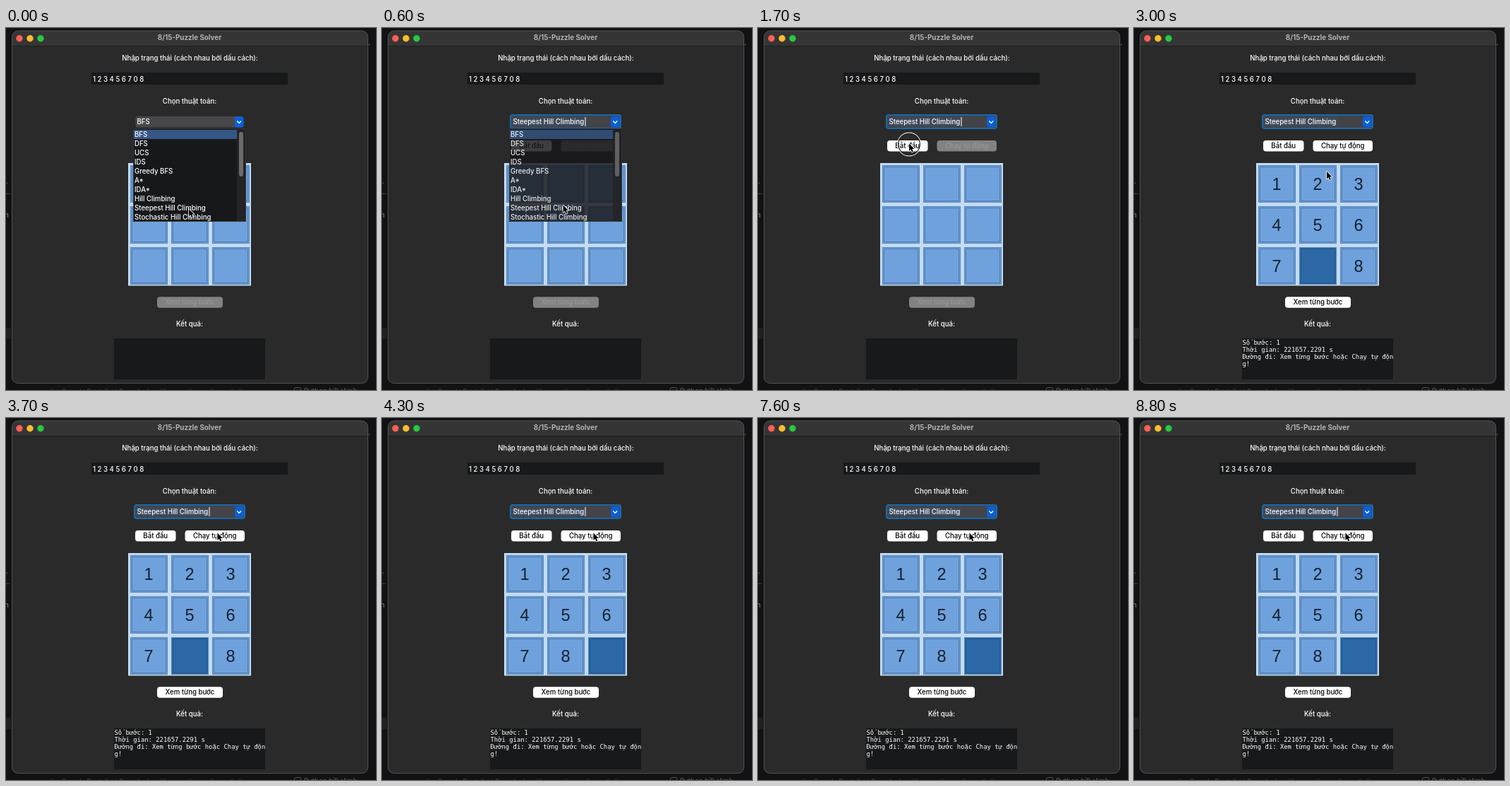
Animation, 524 px wide and 512 px high, one loop 9 s. Source, as an HTML page with a canvas:

```html
<!DOCTYPE html>
<html lang="vi">
<head>
<meta charset="utf-8">
<title>8/15-Puzzle Solver</title>
<style>
html, body { margin: 0; width: 100%; height: 100%; overflow: hidden; background: #121214; }
canvas { display: block; }
</style>
</head>
<body>
<canvas id="stage" width="524" height="512"></canvas>
<script>
const ctx = document.getElementById('stage').getContext('2d');
const LOOP = 9000, STEP = 100;
const SANS = '500 9.62px Inter, "Open Sans", sans-serif';
const MONO = '8.9px "DejaVu Sans Mono", monospace';
const ALGORITHMS = ['BFS', 'DFS', 'UCS', 'IDS', 'Greedy BFS', 'A*', 'IDA*',
  'Hill Climbing', 'Steepest Hill Climbing', 'Stochastic Hill Climbing'];
const RESULT = ['Số bước: 1', 'Thời gian: 221657.2291 s',
  'Đường đi: Xem từng bước hoặc Chạy tự độn', 'g!'];
const CHOSEN = 600, SOLVED = 1900, PLAYED = 4200;

// Pointer stops: time, x, y
const PATH = [[0, 259, 256], [400, 256.5, 250.5], [600, 256.5, 250.5], [1500, 214, 163.5],
  [2700, 214, 163.5], [3000, 273, 203], [3700, 299.5, 162.5], [LOOP, 299.5, 162.5]];

function box(x, y, w, h, fill, r = 0) {
  ctx.fillStyle = fill;
  ctx.beginPath();
  ctx.roundRect(x, y, w, h, r);
  ctx.fill();
}

function frame(x, y, w, h, color, r = 0, width = 1) {
  ctx.strokeStyle = color;
  ctx.lineWidth = width;
  ctx.beginPath();
  ctx.roundRect(x + width / 2, y + width / 2, w - width, h - width, r);
  ctx.stroke();
}

function disc(x, y, r, fill) {
  ctx.fillStyle = fill;
  ctx.beginPath();
  ctx.arc(x, y, r, 0, 7);
  ctx.fill();
}

function text(str, x, y, color = '#fff', align = 'left', font = SANS) {
  ctx.font = font;
  ctx.textAlign = align;
  ctx.fillStyle = color;
  ctx.fillText(str, x, y);
}

function button(label, x, y, w, enabled) {
  box(x, y, w, 15.5, enabled ? '#ffffff' : '#828282', 4);
  text(label, x + w / 2, y + 11, enabled ? '#000' : '#979797', 'center');
}

function drawDesktop() {
  box(0, 0, 524, 512, '#121214');
  box(0, 424, 7, 16, '#202022');
  text('.', 0, 220, '#777');
  text('..', 0, 235, '#777');
  text('n', -2, 268, '#777');
  text('.', 513, 24, '#999');
  text('as the Greedy Best-first Search algorithm continues the path then', 48, 517.5, '#3c3c3e');
  frame(408, 508, 10, 10, '#555', 2);
  text('Python hill climb', 422, 517, '#5a5a5c');
}

function drawWindow() {
  box(8, 3.5, 505, 499.5, '#2a2a2a', 9);
  box(8.5, 4, 504, 21, '#353536', [9, 9, 0, 0]);
  box(9, 25, 503, 1, '#1e1e1e');
  frame(8, 3.5, 505, 499.5, '#505050', 9);
  ['#fe5f57', '#febc2e', '#28c840'].forEach((c, i) => disc(19 + 15 * i, 14.8, 4.7, c));
  text('8/15-Puzzle Solver', 260, 17, '#b4b2b3', 'center', 'bold 9.8px Inter, sans-serif');
  text('Nhập trạng thái (cách nhau bởi dấu cách):', 260.5, 45.5, undefined, 'center');
  box(121, 63, 278, 17, '#17191b');
  text('1 2 3 4 5 6 7 0 8', 123, 75.5);
  text('Chọn thuật toán:', 260, 106.5, undefined, 'center');
  text('Kết quả:', 260, 421.5, undefined, 'center');
  box(153, 439, 214, 58, '#17191b');
}

function caretOn(t) {
  if (t < 2500) return t < 1200 || (t >= 1500 && t < 2100);
  return (t + 99 - 4830 + 5 * 925) % 925 >= 300;
}

function drawCombo(t) {
  const chosen = t >= CHOSEN;
  box(183.5, 125, 153, 15.5, '#48474a', 3);
  if (chosen) {
    box(182, 123, 156, 19, '#444347', 3);
    box(184, 126, 104, 13, '#3d4a5c');
    frame(181, 122, 158, 21, '#1a69a8', 3, 2);
  }
  box(324, 125, 12.5, 15.5, '#0a5fd8', 3);
  ctx.strokeStyle = '#fff';
  ctx.lineWidth = 1.4;
  ctx.beginPath();
  ctx.moveTo(327.3, 131.5);
  ctx.lineTo(330.2, 134.5);
  ctx.lineTo(333.1, 131.5);
  ctx.stroke();
  text(chosen ? ALGORITHMS[8] : 'BFS', 185.5, 136.3);
  if (chosen && caretOn(t)) box(287.5, 126, 1, 13, '#fff');
}

function drawBoard(t) {
  box(173, 191, 174, 173.5, '#c3dbf4');
  const cells = t < SOLVED ? '         ' : t < PLAYED ? '1234567 8' : '12345678 ';
  [...cells].forEach((digit, i) => {
    const x = 176 + 58 * (i % 3), y = 194 + 58 * Math.floor(i / 3);
    const blank = t >= SOLVED && digit === ' ';
    box(x, y, 53, 53, blank ? '#2b68a5' : '#6fa1dc');
    frame(x, y, 53, 53, '#5685b8');
    frame(x + 2, y + 2, 49, 49, blank ? '#24598f' : '#4d7cae');
    text(digit, x + 26, y + 35.3, '#14212f', 'center', '23.5px "Liberation Sans", Arial, sans-serif');
  });
}

function drawList(t) {
  const alpha = t < CHOSEN ? 1 : 0.83 - (t - CHOSEN) / 330;
  if (alpha <= 0) return;
  ctx.globalAlpha = alpha;
  box(180, 142, 160, 132, '#17181a');
  frame(180, 142, 160, 132, '#343436');
  box(327, 143, 12, 130, '#242426');
  box(330, 147, 6, 63, '#6c6c6e', 3);
  box(181, 144, 146, 13, '#365785');
  ctx.globalAlpha = Math.sqrt(alpha);
  ALGORITHMS.forEach((name, i) => text(name, 182, 153.7 + 12.99 * i));
  ctx.globalAlpha = 1;
}

function pointerAt(t) {
  const i = PATH.findIndex(p => p[0] > t);
  const [t0, x0, y0] = PATH[i - 1], [t1, x1, y1] = PATH[i];
  const u = (t - t0) / (t1 - t0), e = u * u * (3 - 2 * u);
  return [x0 + (x1 - x0) * e, y0 + (y1 - y0) * e];
}

function drawRing(x, y, r) {
  for (const [radius, color] of [[r, '#e8e8e8'], [r - 1.2, '#222']]) {
    ctx.strokeStyle = color;
    ctx.lineWidth = 1.2;
    ctx.beginPath();
    ctx.arc(x, y, radius - 0.6, 0, 7);
    ctx.stroke();
  }
}

function drawPointer(t) {
  const [x, y] = pointerAt(t);
  const ring = { 1600: 13, 1700: 17, 1800: 15, 3800: 13, 3900: 12 }[t];
  if (ring) drawRing(x, y + 1, ring);
  ctx.save();
  ctx.translate(x, y);
  ctx.beginPath();
  [[0, 0], [0, 10.5], [2.4, 8.3], [4, 12], [5.8, 11.2], [4.2, 7.6], [7.4, 7.4]]
    .forEach(p => ctx.lineTo(...p));
  ctx.closePath();
  ctx.lineJoin = 'round';
  ctx.strokeStyle = '#fff';
  ctx.lineWidth = 1.6;
  ctx.stroke();
  ctx.fillStyle = '#000';
  ctx.fill();
  ctx.restore();
}

function draw(t) {
  const solved = t >= SOLVED;
  drawDesktop();
  drawWindow();
  drawCombo(t);
  button('Bắt đầu', 183, 159, 57.5, true);
  button('Chạy tự động', 253.5, 159, 84.5, solved);
  drawBoard(t);
  button('Xem từng bước', 214, 380.3, 93, solved);
  if (solved) RESULT.forEach((line, i) => text(line, 153.5, 447.7 + 10 * i, '#fff', 'left', MONO));
  drawList(t);
  drawPointer(t);
}

const start = performance.now();
function tick() {
  const t = (performance.now() - start) % LOOP;
  draw(Math.floor(t / STEP) * STEP);
  requestAnimationFrame(tick);
}
tick();
</script>
</body>
</html>
```
